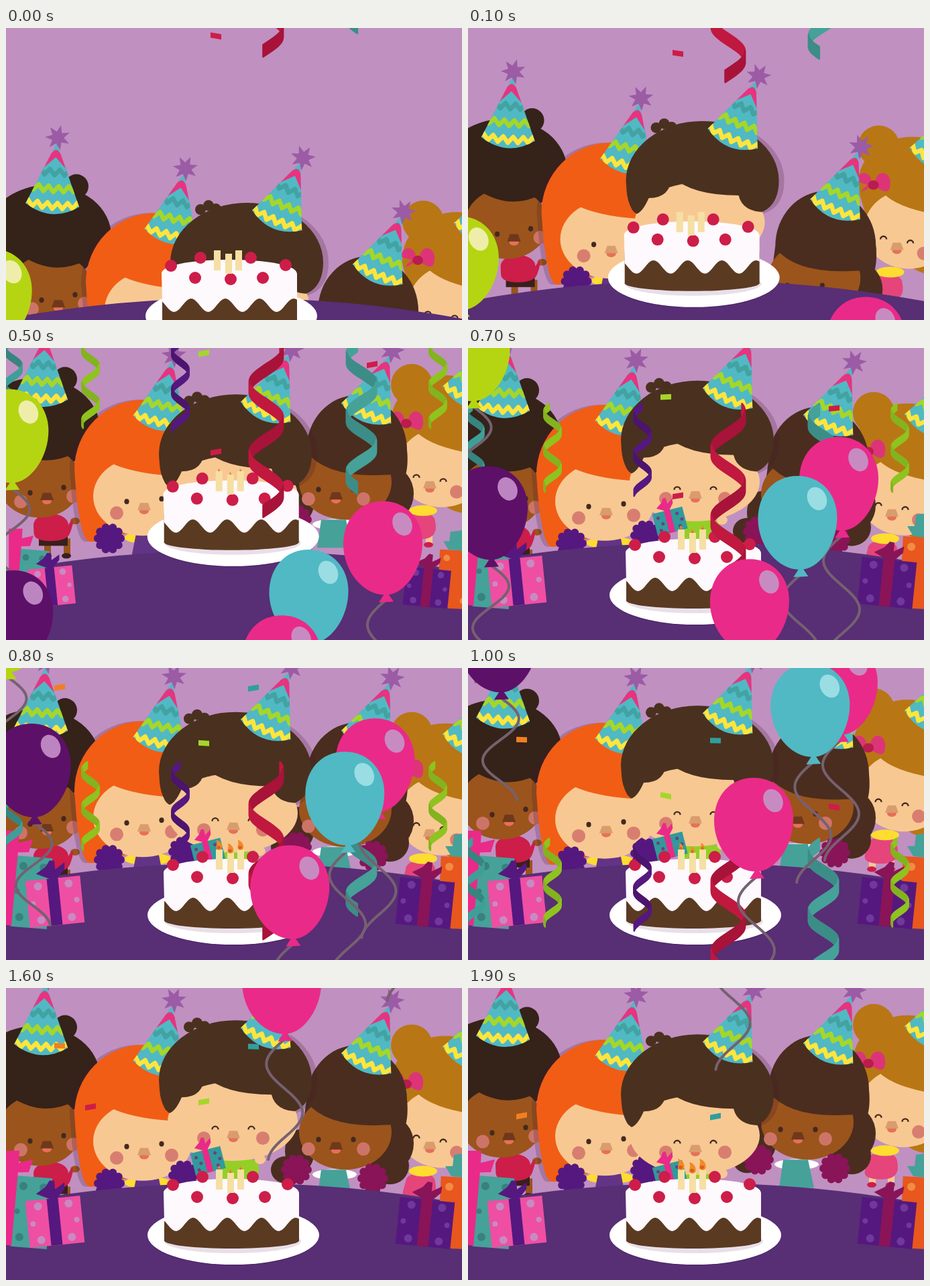
An HTML page with a canvas for the animation above (2000 ms loop, 680x436 px).

```html
<!DOCTYPE html>
<html lang="en">
<head>
<meta charset="utf-8">
<title>Birthday party</title>
<style>
html, body { margin: 0; width: 100%; height: 100%; overflow: hidden; background: #c090c1; }
canvas { display: block; }
</style>
</head>
<body>
<canvas id="stage" width="680" height="436"></canvas>
<script>
const ctx = document.getElementById('stage').getContext('2d');
const LOOP = 2000, STEP = 100, HOP = 12;
const PEACH = '#f8c893', BROWN = '#9b541c', TEAL = '#50b9c4', SEA = '#46a199', PINK = '#ea2a88';
const PURPLE = '#55187f', MAROON = '#891458', LIME = '#a5d62a', RED = '#cd1d49', INK = '#44291f';
const LILAC = '#c78bc2', YELLOW = '#ffe53c', ORANGE = '#f07f24';

// Motion runs on beats of 1/24 s that pass a little unevenly: [ms, beat].
const CLOCK = [[0, 0], [300, 6], [700, 16], [1000, 25], [1600, 39], [1900, 47]];

function beatAt(t) {
  const i = CLOCK.findIndex(([ms]) => ms >= t);
  if (i < 1) return 0;
  const [[t0, b0], [t1, b1]] = [CLOCK[i - 1], CLOCK[i]];
  return Math.round(b0 + (b1 - b0) * (t - t0) / (t1 - t0));
}

const clamp = u => Math.max(0, Math.min(1, u));
const easeLeft = u => (1 - clamp(u)) ** 2;
const hop = (beat, peak) => Math.cos((beat - peak) / HOP * 2 * Math.PI);

function moved(x, y, draw) {
  ctx.save();
  ctx.translate(x, y);
  draw();
  ctx.restore();
}

function fill(color) { ctx.fillStyle = color; ctx.fill(); }

function stroke(color, width) {
  ctx.strokeStyle = color;
  ctx.lineWidth = width;
  ctx.stroke();
}

function oval(color, x, y, rx, ry = rx, turn = 0) {
  ctx.beginPath();
  ctx.ellipse(x, y, rx, ry, turn, 0, 7);
  fill(color);
}

function poly(color, ...p) {
  ctx.beginPath();
  for (let i = 0; i < p.length; i += 2) ctx.lineTo(p[i], p[i + 1]);
  ctx.closePath();
  fill(color);
}

function dots(color, r, ...p) {
  for (let i = 0; i < p.length; i += 2) oval(color, p[i], p[i + 1], r);
}

function bar(color, x, y, w, h) { ctx.fillStyle = color; ctx.fillRect(x, y, w, h); }

// Upper half of an ellipse, closed below through rounded tail corners.
function dome(color, x, y, rx, ry, ...tail) {
  ctx.beginPath();
  ctx.ellipse(x, y, rx, ry, 0, Math.PI, 2 * Math.PI);
  const p = [...tail, x - rx, y];
  for (let i = 0; i < p.length - 2; i += 2)
    ctx.quadraticCurveTo(p[i], p[i + 1], (p[i] + p[i + 2]) / 2, (p[i + 1] + p[i + 3]) / 2);
  ctx.closePath();
  fill(color);
}

// Oval face cut off above by a fringe of quadratic curves.
function face(color, x, y, rx, ry, startX, startY, ...fringe) {
  ctx.save();
  ctx.beginPath();
  ctx.moveTo(-80, startY);
  ctx.lineTo(startX, startY);
  for (let i = 0; i < fringe.length; i += 4) ctx.quadraticCurveTo(...fringe.slice(i, i + 4));
  ctx.lineTo(760, fringe[fringe.length - 1]);
  ctx.lineTo(760, 700);
  ctx.lineTo(-80, 700);
  ctx.clip();
  oval(color, x, y, rx, ry);
  ctx.restore();
}

function shaded(dx, draw) {
  ctx.save();
  ctx.shadowColor = 'rgba(70,25,45,.22)';
  ctx.shadowOffsetX = dx;
  draw();
  ctx.restore();
}

function star(color, x, y, n, outer, inner) {
  const p = [];
  for (let i = 0; i < 2 * n; i++) {
    const r = i % 2 ? inner : outer, a = 0.2 + i * Math.PI / n;
    p.push(x + r * Math.sin(a), y - r * Math.cos(a));
  }
  poly(color, ...p);
}

function pompom(color, x, y) {
  oval(color, x, y, 19);
  for (let a = 0; a < 6.2; a += Math.PI / 5) oval(color, x + 17 * Math.cos(a), y + 17 * Math.sin(a), 6);
}

function zigzag(color, y, width) {
  ctx.beginPath();
  for (let i = -6; i <= 6; i++) ctx.lineTo(i * 7.5, y + (i % 2 ? -4.5 : 4.5) - i * i * 0.12);
  stroke(color, width);
}

function hat(x, y, degrees) {
  ctx.save();
  ctx.translate(x, y);
  ctx.rotate(degrees * Math.PI / 180);
  ctx.save();
  ctx.beginPath();
  ctx.moveTo(0, -96);
  ctx.lineTo(-40, -3);
  ctx.quadraticCurveTo(0, 24, 40, -3);
  ctx.closePath();
  fill(TEAL);
  ctx.clip();
  [YELLOW, LIME, '#43a3a2'].forEach((color, i) => zigzag(color, -2 - 25 * i, 6.5));
  ctx.beginPath();
  [-20, 0, 20].forEach(dx => ctx.lineTo(dx, Math.abs(dx) - 81));
  stroke('#e8337f', 9);
  ctx.restore();
  star('#9b5ba5', 1, -104, 7, 19, 9);
  ctx.restore();
}

// Eyes, nose, mouth and cheeks around the nose at x, y.
function features(x, y, tilt, dark, smiling, eyeGap, cheekGap, cheekDrop) {
  for (const side of [-1, 1]) {
    const ex = x + side * eyeGap, ey = y - 10 + side * tilt;
    oval(dark ? '#cd7468' : '#d87e70', x + side * cheekGap, y + cheekDrop + side * tilt, 10);
    if (smiling) {
      ctx.beginPath();
      ctx.arc(ex, ey + 2, 4.5, Math.PI, 0);
      stroke(INK, 2.4);
    } else oval(INK, ex, ey, 3.6, 4);
  }
  oval('#e67058', x, y + 6, 7, 5);
  poly(dark ? '#6f381c' : '#d99d6d', x - 6, y - 6, x + 6, y - 6, x + 10, y + 5, x - 10, y + 5);
}

function legs(color, shoe, y, ...xs) {
  for (const x of xs) {
    bar(color, x - 5, y - 26, 10, 24);
    oval(shoe, x - 1, y, 7, 4);
  }
}

function curlyBoy() {
  legs(BROWN, '#38201d', 308, 62, 91);
  bar('#38201d', 49, 278, 43, 15);
  oval(BROWN, 103, 256, 7, 5);
  dome(RED, 67, 262, 26, 17, 100, 250, 100, 262, 91, 286, 42, 286);
  oval('#352219', 88, 44, 18);
  dome('#352219', 46, 118, 94, 76, 125, 112, 108, 170, 50, 195, -50, 180);
  face(BROWN, 50, 198, 62, 53, 7, 148, 55, 179, 101, 155, 106, 168, 106, 175);
  features(61, 220, -4, true, false, 25, 39, 3);
  hat(52, 75, 4);
}

function gingerGirl() {
  legs(PEACH, '#80509a', 332, 199, 229);
  oval('#ffdc30', 212, 282, 36, 9);
  poly('#633486', 194, 276, 228, 276, 236, 316, 186, 316);
  shaded(-7, () => dome('#f15d14', 205, 180, 103, 104, 290, 240, 180, 276, 134, 288, 117, 288, 106, 235));
  face(PEACH, 204, 220, 74, 59, 144, 163, 180, 189, 280, 191);
  features(206, 236, -2, false, false, 26, 41, 7);
  pompom(PURPLE, 154, 283);
  pompom(PURPLE, 265, 271);
  hat(228, 111, 12);
}

function bow(color, x, y) {
  poly(color, x, y + 15, x - 23, y + 4, x - 8, y - 5, x - 1, y - 14, x + 6, y - 13,
    x + 6, y, x + 21, y - 9, x + 20, y + 1, x + 6, y + 15);
}

function heldGift() {
  ctx.save();
  ctx.translate(301, 280);
  ctx.rotate(-0.25);
  bar('#319a9b', -23, -16, 46, 34);
  for (const x of [-16, 13]) dots('#6d3f84', 2.5, x, -8, x + 5, 2, x, 11);
  bar(PINK, -5, -16, 9, 34);
  ctx.scale(0.6, 0.7);
  bow(PINK, -2, -36);
  ctx.restore();
}

function middleBoy() {
  dome('#94cf28', 347, 290, 30, 15, 380, 312, 318, 312);
  oval(PEACH, 379, 279, 8, 7);
  dots('#4a301f', 8, 273, 81, 285, 75, 296, 80);
  shaded(8, () => dome('#4a301f', 342, 160, 114, 89, 456, 185, 430, 212, 340, 228, 244, 216, 230, 190));
  face(PEACH, 338, 222, 97, 59, 240, 210, 251, 211, 262, 186, 295, 186, 296, 153,
    325, 182, 396, 182, 402, 207, 436, 207);
  features(339, 242, 0, false, true, 27, 44, 5);
  heldGift();
  hat(386, 100, 22);
}

function pigtailGirl() {
  const hair = '#4a2d1f';
  oval(hair, 416, 264, 21, 20);
  oval(hair, 438, 236, 22, 32);
  oval(hair, 574, 225, 34, 40);
  oval(hair, 572, 258, 29, 28);
  oval('#ffffff', 490, 271, 33, 8);
  poly(SEA, 470, 264, 507, 264, 516, 306, 464, 306);
  dome(hair, 523, 160, 75, 82, 604, 220, 520, 240, 440, 220);
  face(BROWN, 506, 208, 69, 56, 448, 163, 480, 203, 570, 197, 575, 197, 580, 197);
  features(492, 229, 0, true, false, 26, 41, 4);
  pompom(MAROON, 433, 264);
  pompom(MAROON, 547, 277);
  hat(536, 108, 22);
}

function bowGirl() {
  const hair = '#b87714';
  legs(PEACH, RED, 293, 603, 631);
  dome('#e5457b', 618, 258, 22, 14, 646, 285, 588, 285);
  oval(hair, 690, 215, 46, 31);
  oval(hair, 605, 54, 31);
  dome(hair, 655, 110, 81, 70, 740, 200, 600, 200, 574, 120);
  face(PEACH, 650, 178, 67, 59, 583, 106, 602, 103, 608, 120, 630, 148, 705, 158);
  oval('#ffdc30', 622, 242, 21, 8);
  features(632, 204, 3, false, true, 20, 40, 7);
  for (const side of [-1, 1])
    dome('#dd3478', 597 + side * 14, 107, 11, 13, 597 + side * 26, 126, 597, 114);
  oval('#b91c4f', 597, 112, 8, 7);
  hat(686, 76, 25);
}

// Each pops up from below, then hops: height = rest + size * wave.
const people = [
  { draw: curlyBoy, drop: 190, arrive: 6, rest: 12, size: 10, peak: 5.5 },
  { draw: bowGirl, drop: 234, arrive: 6, rest: 25, size: 25, peak: 5.5 },
  { draw: pigtailGirl, drop: 268, arrive: 9, rest: 1, size: 9, peak: 4.5 },
  { draw: gingerGirl, drop: 197, arrive: 6, rest: 4.5, size: 4.5, peak: 3.5 },
  { draw: middleBoy, drop: 198, arrive: 6, rest: -10, size: -13, peak: 3.3 }
];

function table(y) {
  ctx.beginPath();
  ctx.moveTo(0, y + 31);
  ctx.quadraticCurveTo(340, y - 31, 680, y + 31);
  ctx.lineTo(680, 436);
  ctx.lineTo(0, 436);
  fill('#582e75');
}

function present(x, y, w, h, turn, paper, spot, band) {
  ctx.save();
  ctx.translate(x, y);
  ctx.rotate(turn);
  bar(paper, -w / 2, -h / 2, w, h);
  for (const side of [-1, 1])
    for (let i = 0; i < 3; i++)
      oval(spot, side * w * (i % 2 ? 0.4 : 0.28), (i - 1) * h * 0.36, i % 2 ? 4 : 6);
  if (band) {
    bar(band, -9, -h / 2, 17, h);
    bow(band, -1, -h / 2 - 13);
  }
  ctx.restore();
}

function gifts(size) {
  const pop = (x, draw) => moved(x, 388, () => {
    ctx.scale(size, size);
    ctx.translate(-x, -388);
    draw();
  });
  pop(45, () => {
    present(38, 335, 54, 106, 0.08, SEA, '#38817f');
    poly(PINK, -5, 272, 18, 274, 8, 385, -5, 383);
    poly(PINK, -5, 243, 20, 243, 19, 261, 40, 256, 34, 275, -5, 276);
    present(73, 349, 82, 70, -0.1, '#ee4fa3', LILAC, PURPLE);
  });
  pop(640, () => {
    present(676, 336, 60, 107, 0.05, '#e8571d', '#f18c42');
    poly(SEA, 655, 266, 666, 266, 668, 249, 690, 246, 690, 284, 664, 281);
    present(625, 351, 82, 70, 0.1, PURPLE, '#6f399b', MAROON);
  });
}

function flame(x, y, size) {
  moved(x, y, () => {
    ctx.scale(size, size);
    ctx.beginPath();
    ctx.moveTo(-6, -18);
    ctx.bezierCurveTo(6, -17, 10, 2, -1, 1);
    ctx.bezierCurveTo(-11, -1, -1, -10, -6, -18);
    fill('#f08a28');
    oval('#d95f1c', -1, -4, 3.5, 3);
  });
}

function icing(y) {
  return 353 - 10 * Math.cos((y - 304.5) / 51 * 2 * Math.PI + Math.PI);
}

function cake(glow) {
  oval('rgba(40,15,60,.35)', 339, 371, 127, 43);
  oval('#ffffff', 339, 369, 128, 44);
  oval('#e9dfe9', 338, 378, 102, 18);
  bar('#5b3a22', 236, 330, 201, 48);
  oval('#5b3a22', 336.5, 377, 100.5, 12);
  ctx.beginPath();
  ctx.moveTo(235, 306);
  ctx.bezierCurveTo(235, 278, 437, 278, 437, 306);
  for (let x = 437; x >= 235; x -= 3) ctx.lineTo(x, icing(x));
  fill('#fdf9fd');
  dots(RED, 9, 249, 294, 293, 282, 285, 312, 338, 314, 386, 312, 368, 282, 420, 293);
  for (const [x, y] of [[318, 271], [350, 271], [335, 276]]) {
    bar('#f6dfa4', x - 5, y, 10, 30);
    flame(x, y, glow);
  }
}

// Flakes: colour, x and the beat at which each enters at the top.
const flakes = [[RED, 313, -0.9], [RED, 546, 9.1], [RED, 126, 25.4]];
for (const wait of [0, 15.6])
  flakes.push([LIME, 295, 10.4 + wait], ['#2f9f9d', 369, 16.7 + wait], [ORANGE, 80, 16.8 + wait]);

function confetti(beat) {
  for (const [color, x, start] of flakes) {
    const y = (beat - start) * 13.06, lean = 1.5 * Math.sin(beat / 5 + x);
    if (y > -10 && y < 255)
      poly(color, x - 8, y - 4 + lean, x + 8, y - 4 - lean, x + 8, y + 4 - lean, x - 8, y + 4 + lean);
  }
}

// A sine curl drawn with an upright pen; first is the height of its first turn.
const small = { amp: 12.5, half: 27, first: 10, length: 122, pen: 10 };
const ribbons = [
  { ...small, front: '#3f9f98', back: '#36857f', x: 11 },
  { ...small, front: '#8fc31f', back: '#83b31e', x: 126 },
  { ...small, front: '#8fc31f', back: '#83b31e', x: 644 },
  { ...small, front: PURPLE, back: '#4b146e', x: 260, half: 29, first: 14, length: 128 },
  { front: '#c0183f', back: '#a81339', x: 388, amp: -25, half: 52, first: 10, length: 247, pen: 18 },
  { front: SEA, back: '#3c8d87', x: 530, amp: 22, half: 44, first: 18, length: 212, pen: 18 }
];

function ribbon({ front, back, x, amp, half, first, length, pen }, top) {
  ctx.lineJoin = 'round';
  for (let start = first - half, turn = 0; start < length; start += half, turn++) {
    const edge = [];
    for (let y = Math.max(0, start); y <= Math.min(length, start + half); y++)
      edge.push([x - amp * Math.cos((y - first) / half * Math.PI), y + top]);
    ctx.beginPath();
    edge.forEach(([px, py]) => ctx.lineTo(px, py));
    edge.reverse().forEach(([px, py]) => ctx.lineTo(px, py + pen));
    ctx.closePath();
    const color = turn % 2 ? back : front;
    stroke(color, 2.5);
    fill(color);
  }
}

// Steady climb from y by speed per beat; x bends around the beat mid.
const balloons = [
  { color: '#b5d512', shine: '#eeeeaa', side: -1, y: 400, speed: 24.4, x: 5, bend: -0.15, mid: 13 },
  { color: '#5d1068', shine: '#bd84c2', side: -1, y: 744, speed: 31.1, x: 45, bend: -0.15, mid: 26 },
  { color: PINK, shine: LILAC, side: 1, y: 510, speed: 19.2, x: 550, bend: 0.12, mid: 21 },
  { color: TEAL, shine: '#9adde3', side: 1, y: 613, speed: 22, x: 512, bend: -0.42, mid: 23 },
  { color: PINK, shine: LILAC, side: 1, y: 654, speed: 16.8, x: 426, bend: -0.075, mid: 25 }
];

function balloon({ color, shine, side, y, speed, x, bend, mid }, beat) {
  moved(x + bend * (beat - mid) ** 2, y - speed * beat, () => {
    const length = side > 0 ? 183 : 156;
    ctx.beginPath();
    for (let u = 0; u <= 1; u += 0.02)
      ctx.lineTo(4 - side * 27 * Math.sin(u * 2.5 * Math.PI) * Math.min(1, 1.3 - 0.4 * u), 78 + length * u);
    ctx.lineCap = 'round';
    stroke('#75616f', 4);
    poly(color, 5, 64, -6, 81, 16, 80);
    ctx.beginPath();
    ctx.moveTo(0, -70);
    ctx.bezierCurveTo(36, -70, 59, -42, 59, -8);
    ctx.bezierCurveTo(59, 32, 32, 70, 4, 70);
    ctx.bezierCurveTo(-30, 70, -59, 34, -59, -6);
    ctx.bezierCurveTo(-59, -42, -36, -70, 0, -70);
    fill(color);
    oval(shine, 29, -36, 14, 18, -0.45);
  });
}

function draw(beat) {
  bar('#c090c1', 0, 0, 680, 436);
  for (const p of people) {
    const left = easeLeft(beat / p.arrive);
    moved(17 * left, p.rest + p.size * hop(beat, p.peak) + p.drop * left, p.draw);
  }
  confetti(beat);
  const settle = clamp(beat / 16), sink = easeLeft(settle);
  table(291 + 112 * sink);
  gifts(1 - easeLeft((beat - 7) / 7));
  const glow = clamp((beat - 10) / 4) * (0.65 - 0.35 * hop(beat, 3.3));
  moved(-3 * sink, 61 * sink - 112 * Math.sin(Math.PI * settle), () => cake(glow));
  ribbons.forEach(r => ribbon(r, -222 + 19.06 * beat));
  balloons.forEach(b => balloon(b, beat));
}

function tick() {
  draw(beatAt(Math.floor(performance.now() % LOOP / STEP) * STEP));
  requestAnimationFrame(tick);
}
tick();
</script>
</body>
</html>
```
